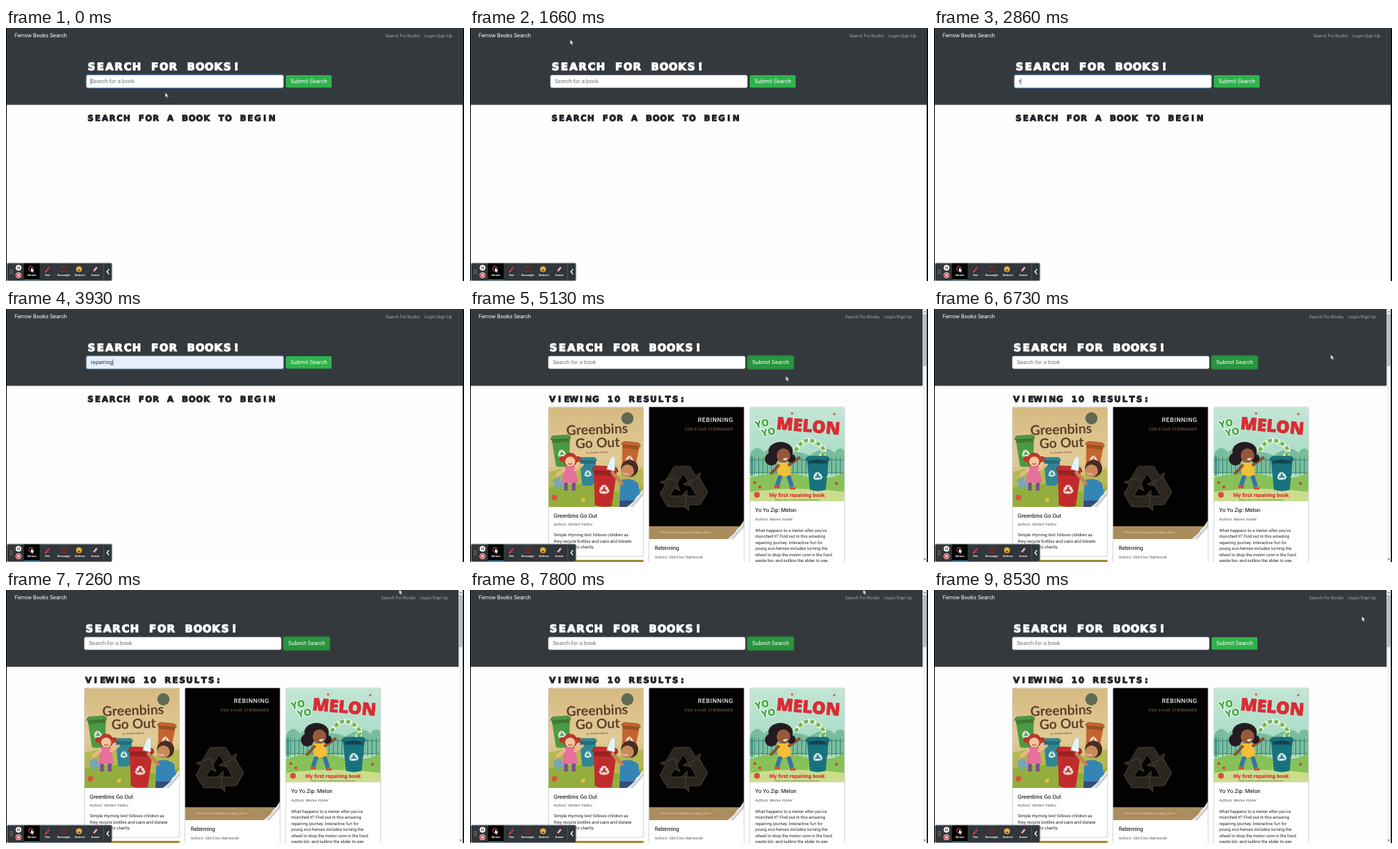
An HTML page for the animation above (9.13 s loop, 640 by 354 pixels).

```html
<!DOCTYPE html>
<html lang="en">
<head>
<meta charset="utf-8">
<title>Book search</title>
<style>
  html, body { margin: 0; width: 100%; height: 100%; overflow: hidden; background: #000; }
  svg { display: block; width: 100vw; height: 100vh; font: 7.75px Roboto, sans-serif; text-rendering: geometricPrecision; }
  .nav { font-size: 6.2px; fill: #a3a6a9; }
  .display { font: 700 14.4px "DejaVu Sans", sans-serif; text-anchor: middle; stroke-width: 1.2; }
  .sub { font-size: 11.3px; fill: #212529; stroke: #212529; stroke-width: 1; }
  .author { font-size: 5.2px; font-style: italic; fill: #555; }
  .blurb { font-size: 6px; fill: #212529; }
  .card { fill: #fff; stroke: #b5b5b5; stroke-width: .6; }
  .tool { font: 700 3.7px "Open Sans", sans-serif; fill: #fff; text-anchor: middle; }
  .caps { text-anchor: end; }

  #results, .results #empty, #ring, #glow, #caret { visibility: hidden; }
  .results #results, .focus #glow, .focus #caret, .pressed #ring { visibility: visible; }
  .results .shift { transform: translateX(-3px); }
  .results .nav { transform: translateX(-6px); }
  .filled #field { fill: #e6effc; }
  .pressed #submit { fill: #27953d; }
  .typing #mouse { visibility: hidden; }

  #mouse { animation: wander 9130ms linear infinite; }
  @keyframes wander {
    0%, .66% { transform: translate(222.5px, 90.5px); animation-timing-function: ease-in-out; }
    9.9% { transform: translate(556px, 8px); }
    11.6% { transform: translate(557px, 15px); animation-timing-function: ease-in-out; }
    18.2% { transform: translate(140px, 16.5px); }
    20.4% { transform: translate(60px, 16px); }
    22.5% { transform: translate(42px, 4px); animation-timing-function: ease-in-out; }
    28.5%, 44.5% { transform: translate(180px, 73px); animation-timing-function: ease-in-out; }
    48.8%, 52% { transform: translate(420px, 74px); animation-timing-function: ease-in-out; }
    59% { transform: translate(452px, 104px); }
    65.7% { transform: translate(436px, 128.5px); animation-timing-function: ease-in-out; }
    69.8% { transform: translate(600px, 62px); }
    73.7% { transform: translate(554.5px, 64px); animation-timing-function: ease-in-out; }
    79.5%, 89% { transform: translate(549.5px, -.5px); animation-timing-function: ease-out; }
    93.4%, 100% { transform: translate(598px, 37px); }
  }
</style>
</head>
<body>
<svg id="stage" viewBox="0 0 640 354" preserveAspectRatio="none">
  <defs>
    <path id="arm" d="M-22-9L-11-28H8L15-16 21-20 17-2 0-5 6-9 0-19-10-2Z"/>
    <g id="loop">
      <use href="#arm"/><use href="#arm" transform="rotate(120)"/><use href="#arm" transform="rotate(240)"/>
    </g>
    <g id="bin">
      <path d="M2 8H32L28 57Q17 61 6 57Z" fill="currentColor"/>
      <path d="M2 8H32L31 15H3Z" opacity=".2"/>
      <path d="M0 9Q1 2 6 2H28Q33 2 34 9Z" fill="currentColor" stroke="#0003"/>
      <use href="#loop" fill="#fffb" transform="translate(17 35) scale(.24)"/>
    </g>
    <linearGradient id="curlShade" x2="1" y2="1">
      <stop offset=".48" stop-color="#777"/><stop offset=".57" stop-color="#f4f4f4"/>
      <stop offset=".66" stop-color="#c0c3c8"/><stop offset=".72" stop-color="#fff"/>
    </linearGradient>
    <path id="curl" d="M-24 0Q-12-7-10-14Q-4-18 0-27V0Z" fill="url(#curlShade)"/>
    <linearGradient id="paper" x2="0" y2="1">
      <stop stop-color="#d6b982"/><stop offset=".5" stop-color="#e2ca94"/><stop offset="1" stop-color="#b7bb59"/>
    </linearGradient>
    <linearGradient id="sky" x2="0" y2="1">
      <stop stop-color="#c3e6d5"/><stop offset=".55" stop-color="#a9dcc6"/><stop offset="1" stop-color="#c4e0a4"/>
    </linearGradient>
    <clipPath id="cover1"><path d="M110 137.500H242V277H110Z"/></clipPath>
    <clipPath id="cover3"><path d="M391.500 137.500H523V269H391.500Z"/></clipPath>
  </defs>

  <path d="M1 0H638.500V354H1Z" fill="#fefefe"/>
  <path d="M1 0H638.500V107.500H1Z" fill="#34393d"/>
  <text x="12" y="13.200" fill="#fff">Ferrow Books Search</text>
  <g class="nav"><text x="530" y="12.700">Search For Books</text><text x="584.500" y="12.700">Login/Sign Up</text></g>

  <g class="shift">
    <text class="display" data-x="113" data-pitch="12.65" y="58.500" fill="#fff" stroke="#fff">SEARCH FOR BOOKS!</text>
    <rect id="glow" x="111" y="64.500" width="278" height="20.500" rx="3" fill="#2f5680"/>
    <rect id="field" x="112.500" y="66" width="275" height="17.500" rx="2" fill="#fff" stroke="#c9d3dd" stroke-width=".5"/>
    <text id="hint" x="118.500" y="77.400" fill="#6c757d">Search for a book</text>
    <text id="typed" x="118.500" y="77.400" fill="#30363c"></text>
    <rect id="caret" y="70.500" width=".6" height="8.500" fill="#222"/>
    <rect id="ring" x="389.800" y="64.500" width="66.500" height="20.500" rx="3" fill="#2e7541"/>
    <rect id="submit" x="391" y="66" width="64" height="17.500" rx="2" fill="#2fb34b"/>
    <text x="397.500" y="77.400" fill="#fff" letter-spacing=".1">Submit Search</text>
  </g>

  <g id="empty">
    <text class="display sub" data-x="113" data-pitch="10.15" y="130">SEARCH FOR A BOOK TO BEGIN</text>
  </g>

  <g id="results">
    <text class="display sub" data-x="110" data-pitch="10.1" y="130">VIEWING 10 RESULTS:</text>
    <g class="card">
      <rect x="109.500" y="137" width="133" height="209" rx="2"/>
      <rect x="250" y="137" width="133" height="240" rx="2"/>
      <rect x="391" y="137" width="132.700" height="240" rx="2"/>
    </g>
    <path d="M109.500 351H242.500V354H109.500Z" fill="#a58a37"/>

    <g clip-path="url(#cover1)">
      <path d="M110 137H242V277H110Z" fill="url(#paper)"/>
      <path d="M110 228Q145 216 178 228T242 222V277H110Z" fill="#b5b853"/>
      <path d="M110 250Q150 238 190 252T242 246V277H110Z" fill="#93ae3d"/>
      <circle cx="220" cy="153" r="8.500" fill="#5f6a55"/>
      <g fill="#60402b" font-family="Lato, sans-serif" font-weight="700" text-anchor="middle" transform="rotate(-2 177 178)">
        <text x="178" y="175" font-size="19">Greenbins</text>
        <text x="178" y="194" font-size="19">Go Out</text>
        <text x="177" y="202" font-size="3.800" font-weight="400">by Norbert Velsho</text>
      </g>
      <use href="#bin" color="#4b9a43" transform="translate(112 176) rotate(-4) scale(.85 .78)"/>
      <use href="#bin" color="#2f8795" transform="translate(152 206) scale(.75 .7)"/>
      <use href="#bin" color="#c4642e" transform="translate(212 183) rotate(6) scale(.8 .75)"/>
      <use href="#bin" color="#c22b2b" transform="translate(171 217) rotate(3) scale(1.080 1)"/>
      <g id="girl">
        <path d="M133 220H146L151 243H128Z" fill="#e5709e"/>
        <path d="M134 243V254M145 243V254" stroke="#7a4a93" stroke-width="5"/>
        <path d="M132 225L122 232M147 225L157 218" stroke="#f0b78e" stroke-width="4" stroke-linecap="round"/>
        <circle cx="140" cy="211" r="10" fill="#b83b27"/>
        <circle cx="129" cy="210" r="4" fill="#b83b27"/><circle cx="151" cy="210" r="4" fill="#b83b27"/>
        <circle cx="140" cy="213.500" r="7" fill="#f5c49f"/>
        <path d="M137 216Q140 219 143 216" fill="none" stroke="#8d3a2b"/>
      </g>
      <path d="M191 224L197 207L202 206L203 211L202 227Z" fill="#e9f2f2" stroke="#a6b8bb" stroke-width=".6"/>
      <g id="boy">
        <path d="M210 240Q224 234 235 244L239 268H209Z" fill="#3485b5"/>
        <path d="M212 244L199 229" stroke="#c58355" stroke-width="5" stroke-linecap="round"/>
        <path d="M209 268H237V277H209Z" fill="#354e78"/>
        <circle cx="223" cy="223" r="12" fill="#4b2b20"/>
        <circle cx="220" cy="226.500" r="9" fill="#c98a5b"/>
        <path d="M214 229Q217 233 221 230" fill="none" stroke="#fff"/>
      </g>
      <path d="M116 239L126 235L131 248L120 252Z" fill="#77a8b0"/>
      <circle cx="118" cy="264" r="4" fill="#d9553b"/><circle cx="158" cy="267" r="3" fill="#e4bd3f"/>
    </g>
    <use href="#curl" x="242.200" y="277"/>
    <text x="117" y="291.500">Greenbins Go Out</text>
    <text class="author" x="117" y="303.300">Authors: Norbert Velsho</text>
    <text class="blurb" data-x="117" data-lead="8.4" y="318.300">Simple rhyming text follows children as|they recycle bottles and cans and donate|old clothes to charity.</text>

    <path d="M250.300 137.300H382.700V304H250.300Z" fill="#020202"/>
    <path d="M250.300 304H382.700V322H250.300Z" fill="#aa8c5d"/>
    <text class="caps" x="368" y="157.500" font-size="8.600" font-weight="500" letter-spacing=".55" fill="#e9e9e6">REBINNING</text>
    <text class="caps" x="368" y="170.300" font-size="5.400" letter-spacing=".4" fill="#92754a">ODD EIVAR STØRMUNDE</text>
    <use href="#loop" fill="#2b2620" stroke="#514736" stroke-width=".8" transform="translate(298 251) scale(1.150 1.100)"/>
    <text x="265" y="314.300" font-size="3.300" fill="#eadcb9">THE FEN PRESS FOUNDATION THINKING SERIES</text>
    <use href="#curl" x="382.700" y="322"/>
    <text x="258" y="337">Rebinning</text>
    <text class="author" x="258" y="349">Authors: Odd Eivar Størmunde</text>

    <g clip-path="url(#cover3)">
      <path d="M391 137H524V270H391Z" fill="url(#sky)"/>
      <path d="M391 203Q401 187 411 201Q424 187 435 204Q456 196 474 205Q499 189 509 201Q517 190 524 199V230H391Z" fill="#79bd9c"/>
      <path id="fence" d="M391 211H524M391 229H524" stroke="#37877a"/>
      <path d="M394 206V234" stroke="#37877a" stroke-width="2"/>
      <path d="M391 220H524" stroke="#37877a" stroke-width="25" stroke-dasharray="1 5"/>
      <path d="M391 236Q430 224 466 233T524 228V270H391Z" fill="#86c257"/>
      <path d="M391 256Q455 247 524 256V270H391Z" fill="#cbdd8d"/>
      <g font-family="Open Sans, sans-serif" font-weight="800" text-anchor="middle" paint-order="stroke" stroke-linejoin="round">
        <g font-size="14" fill="#42ab47" stroke="#fff" stroke-width="2">
          <text transform="translate(409 165) rotate(-13)">YO</text><text transform="translate(418 177) rotate(-13)">YO</text>
        </g>
        <text transform="translate(472 172) rotate(5)" font-size="24" fill="#da2c34" stroke="#da2c34" stroke-width=".8">MELON</text>
      </g>
      <path d="M455 198Q467 177 484 187T490 207" fill="none" stroke="#fff" stroke-width="7" stroke-dasharray="7 2"/>
      <path d="M455 198Q467 177 484 187T490 207" fill="none" stroke="#70b944" stroke-width="5" stroke-dasharray="5 4"/>
      <use href="#bin" color="#17727f" transform="translate(469 204) scale(1 .86)"/>
      <path d="M474 215Q486 206 498 215Z" fill="#163f4b"/>
      <g id="runner">
        <path d="M430 215H447L449 234H430Z" fill="#f2bf36"/>
        <path d="M446 218L460 208M431 219L421 230" stroke="#8b5135" stroke-width="4" stroke-linecap="round"/>
        <path d="M434 233L429 247M445 233L450 249" stroke="#3973a6" stroke-width="6"/>
        <path d="M425 249H433M447 251H455" stroke="#d94335" stroke-width="3"/>
        <ellipse cx="434" cy="199" rx="17" ry="13" fill="#241b20"/>
        <circle cx="421" cy="210" r="9" fill="#241b20"/>
        <circle cx="449" cy="209" r="6" fill="#241b20"/>
        <ellipse cx="438" cy="205" rx="9.500" ry="10" fill="#97583a"/>
        <path d="M437 210Q441 214 444 208" fill="#fff"/>
      </g>
      <g fill="#df3b38">
        <circle cx="398" cy="243" r="2"/><circle cx="405" cy="249" r="2"/><circle cx="512" cy="244" r="2"/><circle cx="450" cy="146" r="1.500"/><circle cx="509" cy="147" r="1.500"/>
      </g>
      <circle cx="401" cy="260" r="4" fill="#d84a40"/>
      <text x="457" y="263" text-anchor="middle" font-size="7.500" font-weight="900" fill="#d83632">My first repairing book</text>
      <text x="457" y="267.500" text-anchor="middle" font-size="2.700" fill="#425b35">Written by Marnie Voskel  Illustrated by Tilda Ormsey</text>
    </g>
    <text x="398.500" y="284">Yo Yo Zip: Melon</text>
    <text class="author" x="398.500" y="296">Authors: Marnie Voskel</text>
    <text class="blurb" data-x="398.5" data-lead="8.55" y="311.500">What happens to a melon after you've|munched it? Find out in this amazing|repairing journey. Interactive fun for|young eco-heroes includes turning the|wheel to drop the melon core in the food|waste bin, and pulling the slider to see</text>

    <path d="M632.500 0H638.500V354H632.500Z" fill="#f4f4f4"/>
    <path d="M633.300 7H637.800V80H633.300Z" fill="#bdbdbd"/>
    <path d="M634 4.500L635.500 2.500 637 4.500ZM634 349.500L635.500 351.500 637 349.500Z" fill="#444"/>
  </g>

  <g id="toolbar">
    <rect x="1" y="328.500" width="147.500" height="25.500" rx="2" fill="#8a8d90"/>
    <rect x="2" y="329.500" width="145.500" height="23.500" rx="1.500" fill="#30363a"/>
    <path d="M25 329.500H47V353H25Z" fill="#000"/>
    <path d="M25 352.200H47" stroke="#3b87bd" stroke-width="1.200"/>
    <path d="M6.500 338V345M8.800 338V345" stroke="#c5c7c8" stroke-dasharray="1 1.500"/>
    <circle cx="17.500" cy="335.500" r="4" fill="#fff"/>
    <path d="M16.300 333.500V337.500M18.700 333.500V337.500" stroke="#333"/>
    <circle cx="17.500" cy="346" r="4" fill="#fff"/>
    <circle cx="17.500" cy="346" r="3.300" fill="#d7353f"/>
    <path d="M16 344.500H19V347.500H16Z" fill="#fff"/>
    <circle cx="35" cy="337" r="3.300" fill="none" stroke="#d8576c"/>
    <path d="M35 335.500L39.500 339.300 37.500 339.600 38.300 341.600 37 342 36.200 340.200 35 341.300Z" fill="#fff"/>
    <path d="M55.500 341L60.500 335" stroke="#c72f40" stroke-width="2.500"/>
    <path d="M54.500 342L55.500 339.500 57 341Z" fill="#eb6a73"/>
    <rect x="77" y="334.500" width="7.500" height="6" fill="none" stroke="#8b2731" stroke-width="1.200"/>
    <circle cx="102" cy="337.500" r="4" fill="#f4b63a"/>
    <path d="M100 338.500H104Q102 342 100 338.500ZM100 336H101M103 336H104" fill="#6d431c" stroke="#6d431c" stroke-width=".7"/>
    <path d="M121.500 339.500L126 334 128 335.700 123.500 341Z" fill="#efabb8"/>
    <path d="M136.500 330V353" stroke="#62676a" stroke-width=".6"/>
    <path d="M144 337.500L141 341 144 344.500" fill="none" stroke="#fff" stroke-width="1.300"/>
    <g class="tool">
      <text x="36" y="346.500">Mouse</text><text x="58" y="346.500">Pen</text><text x="80.500" y="346.500">Rectangle</text><text x="103" y="346.500">Stickers</text><text x="125" y="346.500">Eraser</text>
    </g>
  </g>

  <path id="mouse" d="M0 0V6L1.400 4.900 2.400 7.200 3.500 6.700 2.500 4.500H4.400Z" fill="#fff" stroke="#555" stroke-width=".4"/>
  <path d="M0 0H1V354H0ZM638.500 0H640V354H638.500Z" fill="#000"/>
</svg>

<script>
  const LOOP = 9130, WORD = 'repairing';
  const AUTOFILL = 3700, LOADED = 4700;
  const $ = id => document.getElementById(id);
  const stage = $('stage'), mouse = $('mouse'), typed = $('typed'), caret = $('caret');

  // Fixed-pitch headings: one centred cell per character.
  for (const el of document.querySelectorAll('[data-pitch]')) {
    const pitch = +el.dataset.pitch;
    el.setAttribute('x', [...el.textContent].map((_, i) => +el.dataset.x + (i + .5) * pitch).join(' '));
  }

  for (const el of document.querySelectorAll('[data-lead]')) {
    const lines = el.textContent.split('|');
    el.textContent = '';
    lines.forEach((line, i) => {
      const span = document.createElementNS(el.namespaceURI, 'tspan');
      span.setAttribute('x', el.dataset.x);
      span.setAttribute('dy', i ? el.dataset.lead : 0);
      span.textContent = line;
      el.append(span);
    });
  }

  const between = (t, from, to) => t >= from && t < to;

  function lettersAt(t) {
    if (!between(t, 2800, LOADED)) return 0;
    return t >= AUTOFILL ? WORD.length : Math.min(5, 1 + Math.floor((t - 2800) / 150));
  }

  function draw() {
    const t = mouse.getAnimations()[0].currentTime % LOOP;
    const states = {
      focus: t < 930 || between(t, 2450, 4460),
      typing: between(t, 2800, 4060),
      filled: between(t, AUTOFILL, LOADED),
      pressed: between(t, 4460, 8260),
      results: t >= LOADED
    };
    for (const name in states) stage.classList.toggle(name, states[name]);

    const text = WORD.slice(0, lettersAt(t));
    if (typed.textContent !== text) typed.textContent = text;
    $('hint').style.visibility = text ? 'hidden' : 'visible';
    caret.setAttribute('x', 118.5 + (text ? typed.getComputedTextLength() + .3 : 0));
    requestAnimationFrame(draw);
  }
  draw();
</script>
</body>
</html>
```
